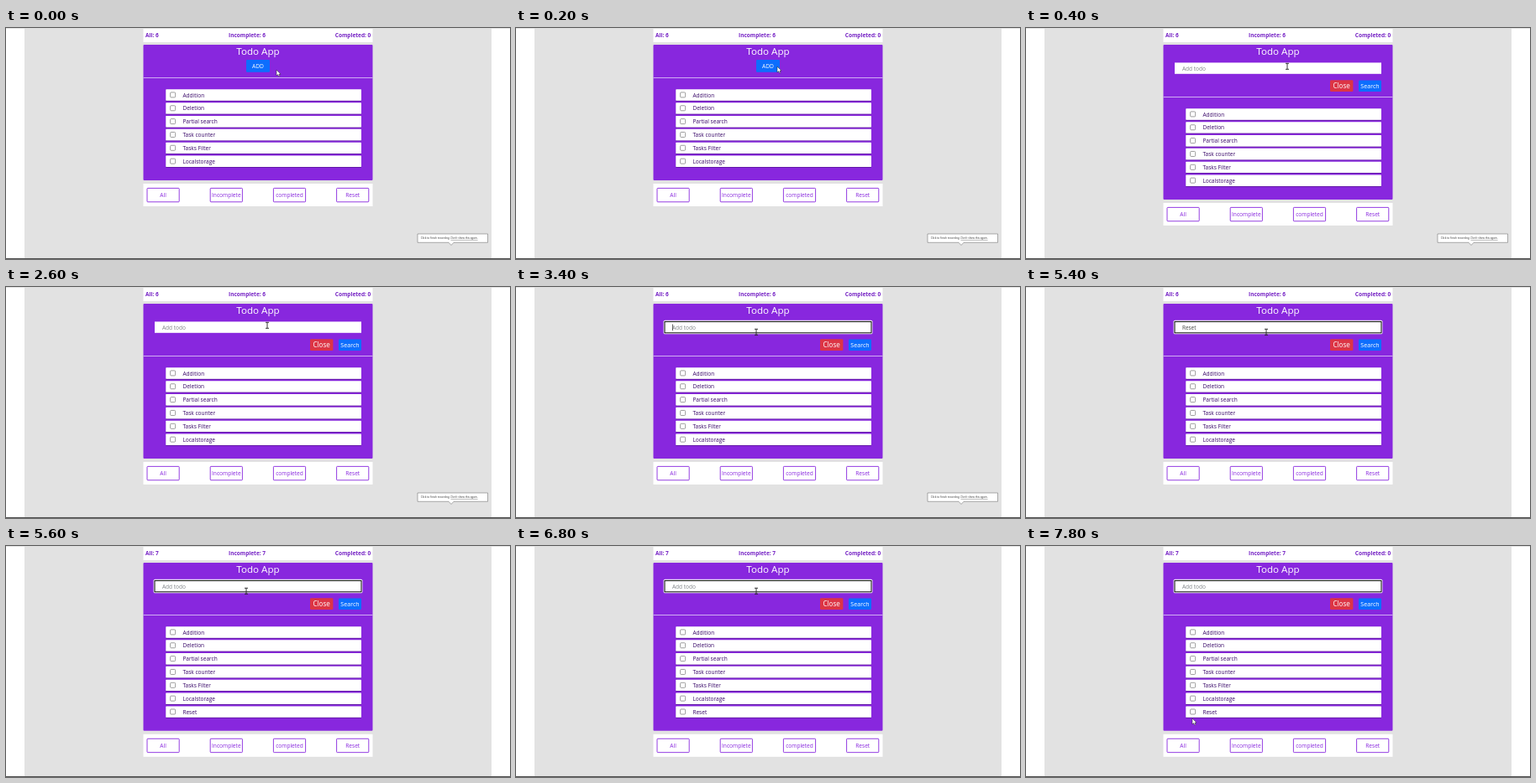
An HTML page for the animation above (8000 ms loop, 600 by 276 pixels).

```html
<!DOCTYPE html>
<html lang="en">
<head>
<meta charset="utf-8">
<title>Todo App</title>
<style>
  html, body { margin: 0; width: 100%; height: 100%; overflow: hidden; background: #fff; }
  svg { display: block; width: 100vw; height: 100vh; }
  text { font-family: "Open Sans", "Noto Sans", sans-serif; }
</style>
</head>
<body>
<svg id="stage" viewBox="0 0 600 276"></svg>
<script>
const LOOP = 8000, TICK = 200;
const OPEN = 400, FOCUS = 3200, TYPE = 4200, TYPED = 4800, HINT_GONE = 5200, SUBMIT = 5600;
const PURPLE = '#8827de', BLUE = '#0d6efd', RED = '#dc3545';
const TASKS = ['Addition', 'Deletion', 'Partial search', 'Task counter', 'Tasks Filter', 'Localstorage'];
const WORD = 'Reset';
const stage = document.getElementById('stage');

// Pointer stops: time, x, y
const POINTER = [
  [0, 322, 50], [200, 311, 46], [2600, 311, 46], [3200, 286, 54],
  [7200, 286, 54], [7800, 198, 206], [8000, 198, 206]
];

const rect = (x, y, w, h, fill, extra = '') =>
  `<rect x="${x}" y="${y}" width="${w}" height="${h}" fill="${fill}" ${extra}/>`;

const text = (x, y, size, fill, string, extra = '') =>
  `<text x="${x}" y="${y}" font-size="${size}" fill="${fill}" ${extra}>${string}</text>`;

const MIDDLE = 'text-anchor="middle"';

function button(x, y, w, h, fill, label, size) {
  return rect(x, y, w, h, fill, 'rx="1.3"') +
    text(x + w / 2, y + h / 2 + size * 0.36, size, '#fff', label, MIDDLE);
}

function header(count) {
  const label = (x, string, anchor) =>
    text(x, 11.2, 6.5, '#7420c4', string, `font-weight="700" text-anchor="${anchor}"`);
  return rect(163.5, 1, 273, 16, '#fff') +
    label(166, `All: ${count}`, 'start') +
    label(287, `Incomplete: ${count}`, 'middle') +
    label(434.3, 'Completed: 0', 'end');
}

function form(t) {
  const focused = t >= FOCUS;
  const letters = t < TYPE || t >= SUBMIT ? 0 : Math.min(WORD.length, 1 + Math.floor((t - TYPE) / 150));
  let out = '';
  if (focused) out += rect(175.6, 39.8, 248.8, 16.4, '#fff', 'rx="1.5"');
  out += rect(177, 41.4, 246, 13.4, '#fff', focused ? 'stroke="#151515" stroke-width="1.1"' : '');
  out += letters
    ? text(186, 51, 6.4, '#444', WORD.slice(0, letters))
    : text(186, 51, 6.5, '#808488', 'Add todo');

  const lastKey = t >= TYPED ? TYPED : t >= TYPE ? t : FOCUS;
  if (focused && (t - lastKey) % 1060 < 530) {
    const caretX = 186 + [0, 4, 7.6, 10.7, 14.3, 16.5][letters];
    out += rect(caretX, 44.5, 0.7, 7.6, '#222');
  }
  out += button(362, 62.3, 27.4, 13.7, RED, 'Close', 8.1);
  out += button(396, 62.6, 27, 13.4, BLUE, 'Search', 7.1);
  if (t >= TYPE && t < HINT_GONE) {
    out += rect(223, 59.5, 34, 20.6, '#fff', 'rx="2" filter="url(#soft)"') +
      text(228.8, 72, 5.6, '#333', WORD);
  }
  return out;
}

function list(tasks, top) {
  return tasks.map((name, i) => {
    const y = top + i * 15.85;
    return rect(190.3, y, 232.7, 13.4, '#fff', 'rx=".6" filter="url(#soft)"') +
      rect(195.6, y + 3.6, 6, 6, '#fff', 'rx="1" stroke="#858585" stroke-width=".8"') +
      text(210.4, y + 9.2, 6.55, '#380768', name, 'font-weight="500"');
  }).join('');
}

function footer(y) {
  return rect(163.5, y, 273, 27, '#fff') +
    ['All', 'Incomplete', 'completed', 'Reset'].map((label, i) => {
      const x = 168 + i * 75.2;
      return rect(x, y + 5.4, 38.2, 16.4, '#fff', `rx=".8" stroke="${PURPLE}" stroke-width=".9"`) +
        text(x + 19.1, y + 16, 6.6, PURPLE, label, MIDDLE);
    }).join('');
}

function recorderTip() {
  return '<path d="M490 246H573.5V256.3H533L530 259.5L527 256.3H490Z" fill="#fff" stroke="#777" stroke-width=".6"/>' +
    text(493.7, 252.4, 3.15, '#333',
      'Click to finish recording. <tspan text-decoration="underline">Don\'t show this again.</tspan>');
}

function pointer(t) {
  const i = POINTER.findIndex((stop, n) => t >= stop[0] && t < POINTER[n + 1][0]);
  const [t0, x0, y0] = POINTER[i], [t1, x1, y1] = POINTER[i + 1];
  const p = (t - t0) / (t1 - t0), ease = p * p * (3 - 2 * p);
  const x = x0 + (x1 - x0) * ease, y = y0 + (y1 - y0) * ease;
  const overInput = t >= OPEN && y < 56;
  const shape = overInput
    ? '<path d="M-2-3.7H2M0-3.7V3.3M-2 3.3H2" fill="none" stroke="#222" stroke-width=".9"/>'
    : '<path d="M0 0V7L1.6 5.6L2.8 8L4 7.4L2.9 5.1H5Z" fill="#fff" stroke="#222" stroke-width=".5"/>';
  return `<g transform="translate(${x} ${y})">${shape}</g>`;
}

function render(t) {
  const open = t >= OPEN;
  const tasks = t >= SUBMIT ? [...TASKS, WORD] : TASKS;
  const shift = open ? 23 : 0;
  const bottom = 182 + shift + (tasks.length - TASKS.length) * 15.85;
  stage.innerHTML =
    `<defs><filter id="soft" x="-10%" y="-20%" width="120%" height="160%">
      <feDropShadow dx="0" dy=".7" stdDeviation=".7" flood-color="#200040" flood-opacity=".5"/>
    </filter></defs>` +
    rect(0, 0, 600, 276, '#fff') +
    rect(22, 0, 556, 276, '#e2e2e2') +
    rect(0, 0, 600, 0.8, '#dedede') +
    rect(0, 275, 600, 1, '#555') +
    header(tasks.length) +
    rect(163.5, 20, 273, bottom - 20, PURPLE, 'rx="1"') +
    rect(163.5, 59 + shift, 273, 0.9, '#d9bdf5') +
    text(300, 32, 11.6, '#fff', 'Todo App', `${MIDDLE} font-weight="500"`) +
    (open ? form(t) : button(286, 38, 28, 14.8, BLUE, 'ADD', 6.7)) +
    list(tasks, 73.3 + shift) +
    footer(bottom + 4) +
    (t < HINT_GONE ? recorderTip() : '') +
    pointer(t);
}

let shown = -1;
function tick() {
  const t = Math.floor(performance.now() % LOOP / TICK) * TICK;
  if (t !== shown) render(shown = t);
  requestAnimationFrame(tick);
}
tick();
</script>
</body>
</html>
```
